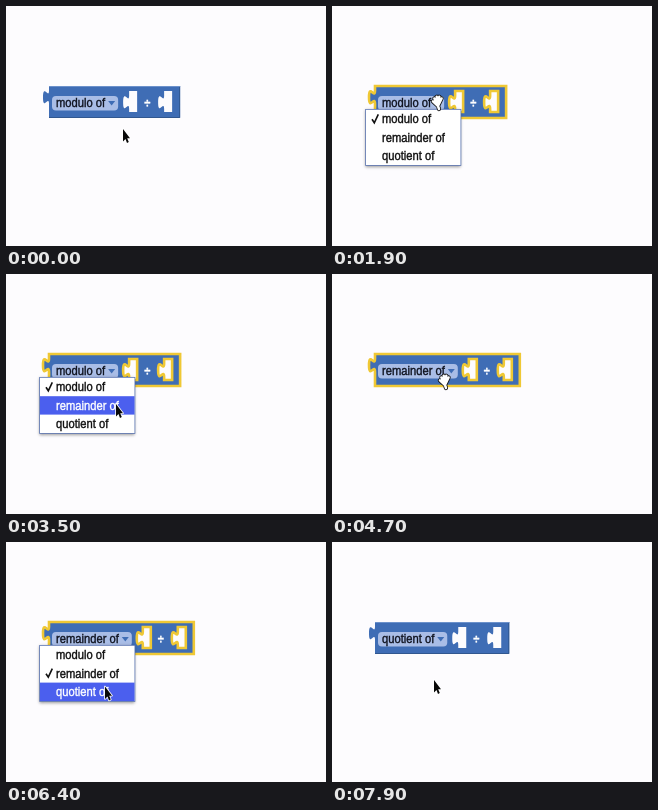
These frames come from a looping animation (320x240 px, 8 s). An HTML page with a canvas:

```html
<!DOCTYPE html>
<html lang="en">
<head>
<meta charset="utf-8">
<title>Dropdown block</title>
<style>
html, body { margin: 0; overflow: hidden; background: #fdfcfe; }
canvas { display: block; }
</style>
</head>
<body>
<canvas id="stage" width="320" height="240"></canvas>
<script>
const ctx = document.getElementById('stage').getContext('2d');
const LOOP = 8000, STEP = 100;
const OPTIONS = ['modulo of', 'remainder of', 'quotient of'];
const FONT = '11.2px "Liberation Sans", Arial, sans-serif';
const TALL = 1.2;
const BLUE = '#3f6db5', PALE = '#a9bde6', LIGHT = '#6c91cb';
const LEFT = 43, TOP = 80, BOTTOM = 112, TEXT_X = 50;
const MENU = { x: 34, y: 103.8, width: 94.5, row: 18.4 };
const TAB = 'v4.5c0,9 -6,-7.2 -6,6.75s6,-2.25 6,6.75';
const ARROW = new Path2D('M0,0V12.5L2.5,10L4,14L5.8,13L4.2,9.3H7Z');

// Where the pointer turns: time, x, y
const TURNS = [
  [200, 117, 123], [1200, 112, 93], [1900, 106, 97], [2700, 104, 114], [3500, 110, 130],
  [4700, 113, 108], [5200, 119, 98], [5800, 109.5, 115.5], [6400, 99, 144.5], [7300, 102, 138]
];

function pointerAt(t) {
  const next = TURNS.findIndex(turn => turn[0] > t);
  const to = TURNS.at(next), from = TURNS[Math.max(0, next - 1)];
  if (next < 1) return { x: to[1], y: to[2] };
  const k = (t - from[0]) / (to[0] - from[0]);
  const ease = k * k * (3 - 2 * k);
  return { x: from[1] + (to[1] - from[1]) * ease, y: from[2] + (to[2] - from[2]) * ease };
}

function text(str, x, y, color, weight = '') {
  ctx.save();
  ctx.translate(x, y);
  ctx.scale(1, TALL);
  ctx.font = `${weight} ${FONT}`;
  ctx.fillStyle = ctx.strokeStyle = color;
  ctx.lineWidth = 0.35;
  ctx.fillText(str, 0, 0);
  ctx.strokeText(str, 0, 0);
  ctx.restore();
}

function stroke(path, color, width) {
  ctx.strokeStyle = color;
  ctx.lineWidth = width;
  ctx.stroke(path);
}

function fill(path, color) {
  ctx.fillStyle = color;
  ctx.fill(path, 'evenodd');
}

function rect(x, y, w, h, color) {
  ctx.fillStyle = color;
  ctx.fillRect(x, y, w, h);
}

// Returns the block's right edge.
function drawBlock(label, selected) {
  ctx.font = FONT;
  const end = TEXT_X + ctx.measureText(label).width;
  const right = end + 75;
  const sockets = [end + 24, end + 59].map(x => `M${x},85${TAB}V106h8V85Z`).join('');
  const shape = new Path2D(`M${LEFT},${TOP}${TAB}V${BOTTOM}H${right}V${TOP}Z${sockets}`);

  fill(shape, BLUE);
  if (selected) {
    stroke(shape, '#efc835', 2.6);
  } else {
    stroke(new Path2D(`M${right - 0.5},${TOP}V${BOTTOM - 0.5}H${LEFT}`), '#31578f', 1);
    stroke(new Path2D(`M${LEFT},${TOP + 0.5}H${right}`), LIGHT, 1);
  }

  const field = new Path2D();
  field.roundRect(46, 90, end - 33, 14.5, 4);
  fill(field, PALE);
  text(label, TEXT_X, 101, '#101420');
  fill(new Path2D(`M${end + 3},95h7l-3.5,4.5Z`), BLUE);
  text('÷', end + 39, 101, '#fff', 'bold');
  return right;
}

function drawMenu(current, hovered) {
  const { x, y, width, row } = MENU;
  ctx.save();
  ctx.shadowColor = 'rgba(0,0,0,.4)';
  ctx.shadowBlur = 3;
  ctx.shadowOffsetY = 1;
  rect(x - 0.8, y - 0.8, width + 1.6, row * 3 + 1.6, '#5f78b4');
  ctx.restore();
  rect(x, y, width, row * 3, '#fff');

  OPTIONS.forEach((label, i) => {
    const top = y + i * row, color = i === hovered ? '#fff' : '#111';
    if (i === hovered) rect(x, top, width, row, '#4b5fee');
    text(label, TEXT_X, top + 13.3, color);
    if (i === current) stroke(new Path2D(`M40,${top + 9.5}l2.3,3.5l4,-8.5`), color, 1.6);
  });
}

function drawHand() {
  const hand = new Path2D('M0,3L1,6');
  for (let finger = 0; finger < 5; finger++) {
    const angle = -1 + finger * 0.4;
    const reach = 7.5 + 2 * Math.cos(angle);
    hand.moveTo(0, 3);
    hand.lineTo(Math.sin(angle) * reach * 0.7, 3 - Math.cos(angle) * reach);
  }
  ctx.lineCap = 'round';
  stroke(hand, '#111', 4.2);
  stroke(hand, '#fff', 2.5);
}

function drawPointer({ x, y }, isHand) {
  ctx.save();
  ctx.translate(x, y);
  ctx.lineJoin = 'round';
  if (isHand) {
    drawHand();
  } else {
    stroke(ARROW, '#fff', 1.6);
    fill(ARROW, '#080808');
  }
  ctx.restore();
}

function draw(now) {
  const t = Math.floor(now % LOOP / STEP) * STEP;
  const pointer = pointerAt(t);
  const current = t < 3700 ? 0 : t < 6500 ? 1 : 2;
  const selected = t >= 1600 && t < 7500;
  const open = t >= 1900 && t < 3700 || t >= 5200 && t < 6500;

  rect(0, 0, 320, 240, '#fdfcfe');
  const right = drawBlock(OPTIONS[current], selected);
  if (open) drawMenu(current, Math.floor((pointer.y - MENU.y) / MENU.row));

  const overMenu = open && pointer.y >= MENU.y;
  const overBlock = pointer.x > LEFT && pointer.x < right && pointer.y > TOP && pointer.y < BOTTOM;
  drawPointer(pointer, overBlock && !overMenu);
  requestAnimationFrame(draw);
}

requestAnimationFrame(draw);
</script>
</body>
</html>
```
